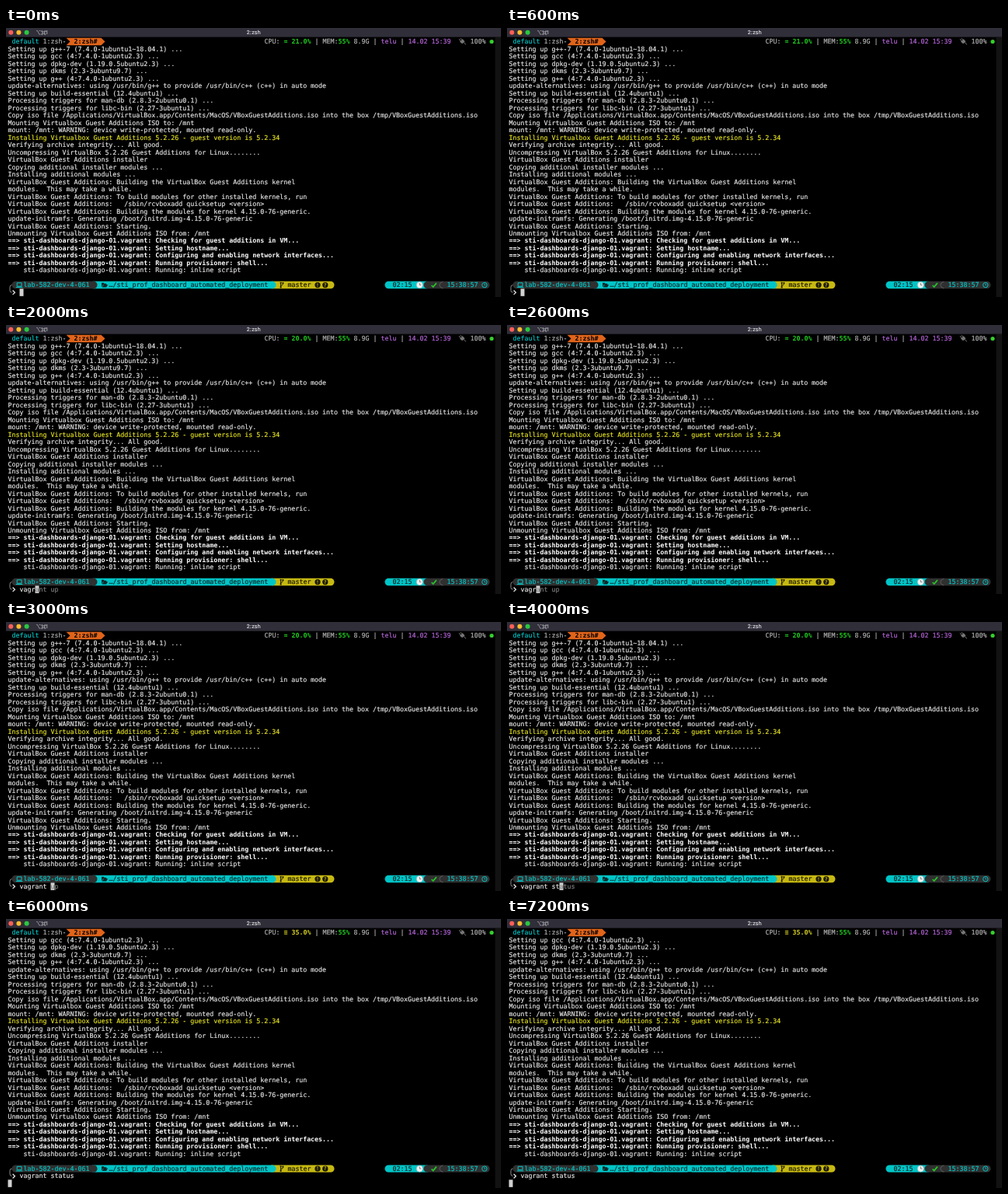
Recreate the animation shown at these times as an HTML page. Size 637x346 px, loop 8000 ms.

```html
<!DOCTYPE html>
<html lang="en">
<head>
<meta charset="utf-8">
<title>Terminal</title>
<style>
  html, body { margin: 0; width: 100%; height: 100%; overflow: hidden; background: #000; }
  svg { display: block; width: 637px; height: 346px; }
  text {
    font: 8.305px "DejaVu Sans Mono", "Liberation Mono", monospace;
    white-space: pre;
    text-rendering: geometricPrecision;
    fill: currentColor;
    stroke: currentColor;
    stroke-width: .18px;
  }
  .b { font-weight: bold; stroke: none; }
  .ui { font: 7px Inter, "Liberation Sans", sans-serif; }
</style>
</head>
<body>
<svg viewBox="0 0 637 346">
  <defs><clipPath id="view"><rect y="22.2" width="637" height="323.8"/></clipPath></defs>
  <rect width="637" height="346"/>
  <rect x="629.5" y="12" width="7.5" height="334" fill="#121212"/>
  <rect width="637" height="11.6" fill="#302e39"/>
  <circle cx="6.3" cy="5.7" r="3" fill="#fe5f57"/>
  <circle cx="16.4" cy="5.7" r="3" fill="#febc2e"/>
  <circle cx="26.6" cy="5.7" r="3" fill="#28c840"/>
  <g fill="none" stroke="#b4b3b8" stroke-width=".7">
    <path d="M39 3.6h1.6l2.2 4.6h1.8M42.6 3.6h2"/>
    <path d="M47 4.9h2.6v2.4h-2.6zM47 4.9h-.6a.7.7 0 1 1 .6-.6zM49.6 4.9h.6a.7.7 0 1 0-.6-.6zM47 7.3h-.6a.7.7 0 1 0 .6.6zM49.6 7.3h.6a.7.7 0 1 1-.6.6z"/>
  </g>
  <text class="ui" x="51" y="8.3" color="#b4b3b8" style="font-size:6.5px">1</text>
  <text class="ui" x="318.6" y="8.2" color="#dddce0" text-anchor="middle">2:zsh</text>
  <g id="bar"></g>
  <g clip-path="url(#view)"><g id="screen"></g></g>
  <path id="mouse" d="M482.3 166.6q1.7 0 1.7 1.2q0-1.2 1.7-1.2M484 167.6v6M482.3 174.5q1.7 0 1.7-1.2q0 1.2 1.7 1.2M483 170.9h2"
        fill="none" stroke="#bdbdbd" stroke-width=".9"/>
</svg>
<script>
const CW = 5, LH = 9.49, X0 = 2.5, Y0 = 12.7;
const FG = '#e6e6e6', CYAN = '#00c5c7', YELLOW = '#c7b912', DARK = '#303030',
      GREEN = '#1fd01f', PURPLE = '#b565d8', ORANGE = '#e0641a', GREY = '#b0b0b0';
const $ = id => document.getElementById(id);
const bar = $('bar'), screen = $('screen');
const colX = c => X0 + c * CW;
const rowY = r => Y0 + r * LH;

function add(parent, tag, attrs) {
  const el = document.createElementNS('http://www.w3.org/2000/svg', tag);
  for (const k in attrs) el.setAttribute(k, attrs[k]);
  return parent.appendChild(el);
}
function write(parent, col, row, str, color = FG, bold = false) {
  const el = add(parent, 'text', { x: colX(col), y: rowY(row) + 7.55, color, class: bold ? 'b' : '' });
  el.textContent = str;
  return el;
}
const path = (parent, d, attrs) => add(parent, 'path', { d, fill: 'none', 'stroke-width': 1, ...attrs });
const disc = (cx, cy, r, attrs) => add(screen, 'circle', { cx, cy, r, ...attrs });

// Status bar
write(bar, 1, 0, 'default', CYAN);
write(bar, 9, 0, '1:zsh-', GREY);
path(bar, `M77.5 ${Y0}H122.5l5 4.74l-5 4.74H77.5l5-4.74z`, { fill: ORANGE });
write(bar, 17, 0, '2:zsh#', '#000', true);
write(bar, 66, 0, 'CPU:', GREY);
const cpuIcon = write(bar, 71, 0, '', GREEN, true);
const cpuText = write(bar, 73, 0, '', GREEN, true);
write(bar, 81, 0, 'MEM:', GREY);
write(bar, 85, 0, '55%', GREEN, true);
write(bar, 89, 0, '8.9G', GREY);
write(bar, 96, 0, 'telu', PURPLE);
write(bar, 103, 0, '14.02 15:39', PURPLE);
write(bar, 119, 0, '100%', GREY);
for (const c of [79, 94, 101]) write(bar, c, 0, '|', GREY);
path(bar, 'M582.8 14.4l2.4 2M584.8 13.2l2.2 2.2', { stroke: '#8d8d8d' });
path(bar, 'M583.8 17.4l4-3.2l2.6 3.2l-3.4 2.8z', { fill: '#777' });
path(bar, 'M588.6 18.2l3.4 3.2', { stroke: '#777' });
add(bar, 'circle', { cx: 625, cy: 17.5, r: 2.6, fill: '#35d02b' });

// Output
const lines = `Setting up g++-7 (7.4.0-1ubuntu1~18.04.1) ...
Setting up gcc (4:7.4.0-1ubuntu2.3) ...
Setting up dpkg-dev (1.19.0.5ubuntu2.3) ...
Setting up dkms (2.3-3ubuntu9.7) ...
Setting up g++ (4:7.4.0-1ubuntu2.3) ...
update-alternatives: using /usr/bin/g++ to provide /usr/bin/c++ (c++) in auto mode
Setting up build-essential (12.4ubuntu1) ...
Processing triggers for man-db (2.8.3-2ubuntu0.1) ...
Processing triggers for libc-bin (2.27-3ubuntu1) ...
Copy iso file /Applications/VirtualBox.app/Contents/MacOS/VBoxGuestAdditions.iso into the box /tmp/VBoxGuestAdditions.iso
Mounting Virtualbox Guest Additions ISO to: /mnt
mount: /mnt: WARNING: device write-protected, mounted read-only.
Installing Virtualbox Guest Additions 5.2.26 - guest version is 5.2.34
Verifying archive integrity... All good.
Uncompressing VirtualBox 5.2.26 Guest Additions for Linux........
VirtualBox Guest Additions installer
Copying additional installer modules ...
Installing additional modules ...
VirtualBox Guest Additions: Building the VirtualBox Guest Additions kernel
modules.  This may take a while.
VirtualBox Guest Additions: To build modules for other installed kernels, run
VirtualBox Guest Additions:   /sbin/rcvboxadd quicksetup <version>
VirtualBox Guest Additions: Building the modules for kernel 4.15.0-76-generic.
update-initramfs: Generating /boot/initrd.img-4.15.0-76-generic
VirtualBox Guest Additions: Starting.
Unmounting Virtualbox Guest Additions ISO from: /mnt
==> sti-dashboards-django-01.vagrant: Checking for guest additions in VM...
==> sti-dashboards-django-01.vagrant: Setting hostname...
==> sti-dashboards-django-01.vagrant: Configuring and enabling network interfaces...
==> sti-dashboards-django-01.vagrant: Running provisioner: shell...
    sti-dashboards-django-01.vagrant: Running: inline script`.split('\n');
lines.forEach((s, i) => {
  const bold = s.startsWith('==>');
  const color = bold ? '#fff' : s.startsWith('Installing V') ? '#e6e322' : FG;
  write(screen, 0, i + 1, s, color, bold);
});

// Prompt
const P = 33, py = rowY(P), mid = py + LH / 2;
const pill = (x1, x2, fill) =>
  add(screen, 'rect', { x: x1, y: py, width: x2 - x1, height: LH, rx: LH / 2, fill });
pill(338, 422.5, YELLOW);
pill(108, 347.5, CYAN);
pill(7.5, 117.5, DARK);
pill(487.5, 546, CYAN);
pill(537.5, 622.5, DARK);

path(screen, `M7.5 ${mid}Q5 ${mid} 5 ${mid + 2.6}V${mid + LH - 2.6}Q5 ${mid + LH} 7.5 ${mid + LH}`, { stroke: '#8a8a8a' });
path(screen, `M8.6 ${mid + LH - 2.6}l2.8 2.7l-2.8 2.7`, { stroke: '#e6e6e6', 'stroke-width': 1.3 });
path(screen, `M14.2 ${mid - 2.8}h5.8v4.4h-5.8zM12.8 ${mid + 2.9}h8.6`, { stroke: CYAN });
write(screen, 4, P, 'lab-582-dev-4-061', CYAN);
path(screen, `M123 ${mid + 2.8}v-5.6h2.6l1 1h2.6v1.3h-4.2zM123.8 ${mid + 2.8}l1.8-3.4h5.4l-1.8 3.4z`, { fill: '#10282a' });
write(screen, 26, P, '…/sti_prof_dashboard_automated_deployment', '#10282a');
path(screen, `M353.6 ${mid - 3}v6M356.4 ${mid - 2.6}v1.2q0 1.6-2.8 2.2`, { stroke: '#1c1a00' });
for (const [x, y] of [[353.6, -2.8], [353.6, 2.8], [356.4, -2.5]]) disc(x, mid + y, 1.1, { fill: '#1c1a00' });
write(screen, 72, P, 'master', '#1c1a00');
[['!', 401], ['?', 410.8]].forEach(([s, x]) => {
  disc(x, mid, 3.6, { fill: '#1c1a00' });
  const t = add(screen, 'text', { x, y: mid + 2.3, color: YELLOW, class: 'b', 'text-anchor': 'middle', style: 'font-size:6.4px' });
  t.textContent = s;
});
write(screen, 99, P, '02:15', '#10282a');
disc(532.3, mid, 4, { fill: '#f2f2f2', stroke: '#b5b5b5', 'stroke-width': .6 });
path(screen, `M532.3 ${mid - 2.6}v2.6h2`, { stroke: '#555', 'stroke-width': .7 });
path(screen, `M547.6 ${mid + .4}l2.1 2.1l4.2-5`, { stroke: '#27c427', 'stroke-width': 1.7 });
path(screen, `M562.3 ${py + .4}q-4.4 1.2-4.4 4.34t4.4 4.34`, { stroke: '#777', 'stroke-width': .6 });
write(screen, 113, P, '15:38:57', CYAN);
disc(615.8, mid, 3.2, { fill: 'none', stroke: CYAN });
path(screen, `M615.8 ${mid - 2}v2.2h1.5`, { stroke: CYAN, 'stroke-width': .8 });

// Command line
const typed = write(screen, 3, P + 1, '');
const hint = write(screen, 3, P + 1, '', '#7d7d7d');
const caret = add(screen, 'rect', { width: CW, height: LH, fill: '#d2d2d2' });
const under = write(screen, 3, P + 1, '', '#808080');

// start ms, typed text, suggested rest, CPU load, pointer shown, entered
const steps = [
  [0, '', '', 21, 0, 0],
  [1000, '', '', 21, 1, 0],
  [2000, 'vagr', 'ant up', 20, 0, 0],
  [3000, 'vagrant ', 'up', 20, 0, 0],
  [4000, 'vagrant st', 'atus', 20, 0, 0],
  [5000, 'vagrant status', '', 20, 0, 0],
  [6000, 'vagrant status', '', 35, 0, 1]
];
let shown;

function show(step) {
  const [, cmd, rest, cpu, pointer, entered] = step;
  const col = 3 + cmd.length;
  typed.textContent = cmd;
  under.textContent = rest.slice(0, 1);
  under.setAttribute('x', colX(col));
  hint.textContent = rest.slice(1);
  hint.setAttribute('x', colX(col + 1));
  caret.setAttribute('x', colX(entered ? 0 : col));
  caret.setAttribute('y', rowY(P + 1 + entered));
  screen.setAttribute('transform', `translate(0 ${-LH * entered})`);
  $('mouse').setAttribute('visibility', pointer ? 'visible' : 'hidden');
  const high = cpu >= 30;
  cpuIcon.textContent = high ? '≡' : '=';
  cpuText.textContent = cpu.toFixed(1) + '%';
  for (const el of [cpuIcon, cpuText]) el.setAttribute('color', high ? '#d8d020' : GREEN);
}

const start = performance.now();
function tick() {
  const t = (performance.now() - start) % 8000;
  const step = steps.findLast(s => s[0] <= t);
  if (step !== shown) show(shown = step);
  requestAnimationFrame(tick);
}
tick();
</script>
</body>
</html>
```
